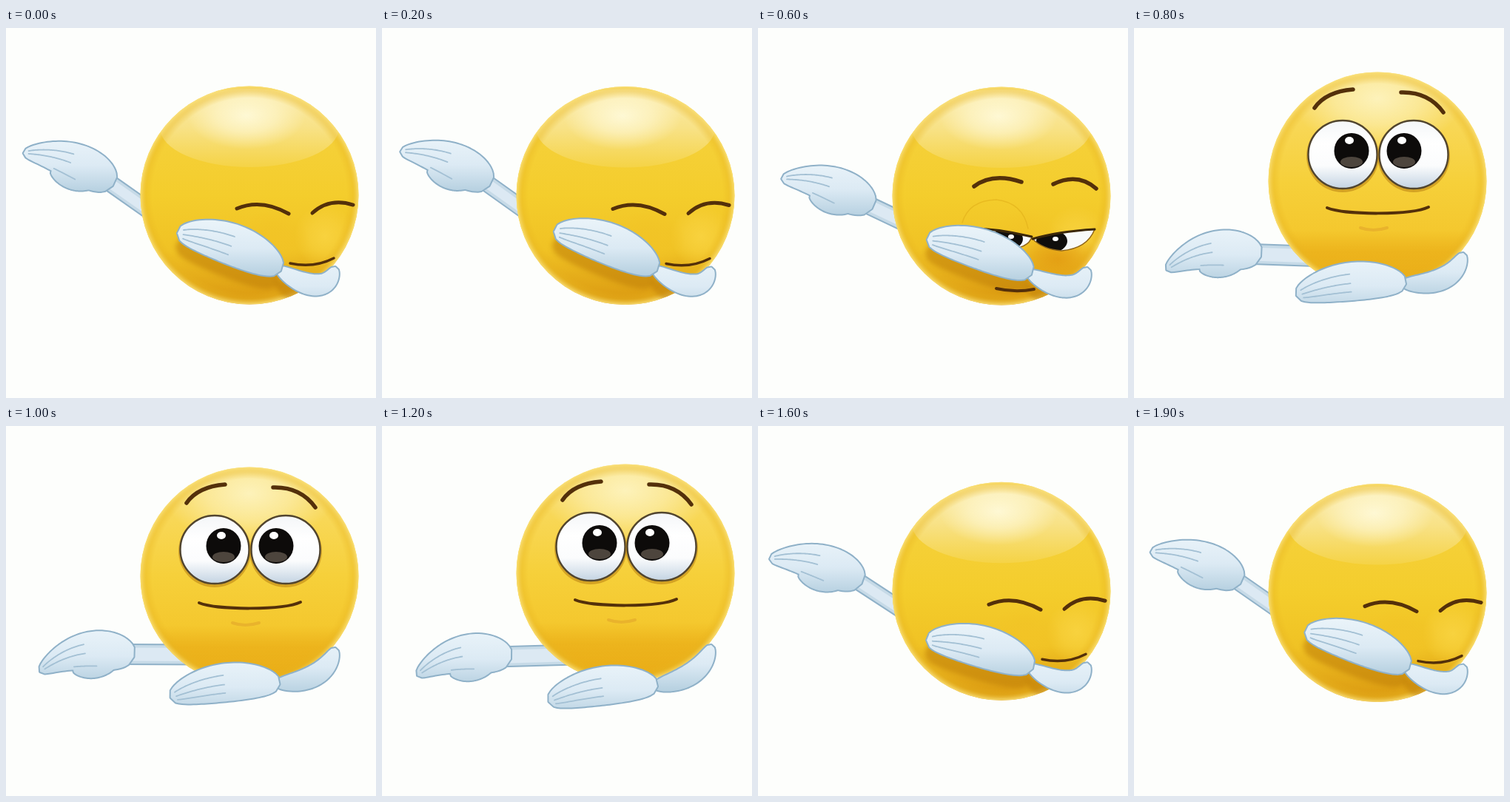
Write an HTML page with a canvas that moves like this. It is 500x500 px and loops after 2 s.

```html
<!DOCTYPE html>
<html lang="en">
<head>
<meta charset="utf-8">
<title>Dabbing smiley</title>
<style>
html, body { margin: 0; width: 100%; height: 100%; overflow: hidden; background: #fdfefc; }
canvas { display: block; width: 100vw; height: 100vh; }
</style>
</head>
<body>
<canvas id="stage" width="500" height="500"></canvas>
<script>
const ctx = document.getElementById('stage').getContext('2d');
const BROWN = '#54300a', SKIN_EDGE = '#8fb1c8';
const HEAD_X = 329, R = 147.5;

const mix = (a, b, t) => a + (b - a) * t;
const clamp = v => Math.max(0, Math.min(1, v));

// rest: 0 is the dab, 1 the arms lowered. drift: slow sway while a pose is held.
function poseAt(step) {
  const rest = clamp(Math.min((step - 5) / 3, (15 - step) / 2));
  const sinceDab = step < 15 ? step + 4 : step - 16;
  const drift = mix(1.5 * Math.exp(-sinceDab / 3) - 0.4, (step - 8) / 4, rest);
  const headY = mix(226, 207, rest ** 3) - mix(2.5, 8, rest) * drift;
  const turn = rest ** 2, sway = mix(4.5, 2, rest) * drift, sink = 6 * rest * drift;
  const face = rest < 0.2 ? shutFace : rest < 0.6 ? slyFace : openFace;
  return {
    face, headY, rest,
    left: makeHand({
      x: mix(144, 171, rest) + mix(-4, 3, rest) * drift, y: mix(213, 309, rest) + sink,
      angle: mix(20, -8, turn) - sway, length: 128, bend: mix(0.19, 0.27, turn),
      width: 34, taper: 0.55, thumb: true
    }),
    right: makeHand({
      x: mix(371, 367, rest) + 5 * rest * drift, y: mix(328, 346, rest) + sink,
      angle: mix(20, -6, turn) - sway, length: 148, bend: 0.15,
      width: mix(29, 27, rest), taper: 0.12
    })
  };
}

// Quadratic curve; at(t, off) gives a point pushed sideways by off.
function curve([x0, y0], [cx, cy], [x1, y1]) {
  return (t, off = 0) => {
    const dx = mix(cx - x0, x1 - cx, t), dy = mix(cy - y0, y1 - cy, t);
    const len = Math.hypot(dx, dy);
    return [
      mix(mix(x0, cx, t), mix(cx, x1, t), t) + off * dy / len,
      mix(mix(y0, cy, t), mix(cy, y1, t), t) - off * dx / len
    ];
  };
}

function trace(at, half, from, to, path = new Path2D()) {
  for (let i = 0; i <= 40; i++) {
    const t = mix(from, to, i / 40);
    path.lineTo(...at(t, half(t)));
  }
  return path;
}

const profile = (width, taper) => t =>
  width * Math.max(0, Math.sin(Math.PI * t)) ** 0.4 * (1 - taper * t);

// Limb with rounded ends around a curve.
function tube(at, half) {
  const path = trace(at, half, 0, 1);
  trace(at, t => -half(t), 1, 0, path);
  path.closePath();
  return path;
}

function makeHand({ x, y, angle, length, bend, width, taper, thumb }) {
  const a = angle * Math.PI / 180, cos = Math.cos(a), sin = Math.sin(a);
  const reach = (along, up) => [x + length * (up * sin - along * cos), y - length * (along * sin + up * cos)];
  const at = curve([x, y], reach(0.5, bend), reach(1, 0));
  const half = profile(width, taper);
  const shapes = [tube(at, half)];
  const lines = [-0.4, 0.1, 0.55].map(k => trace(at, t => k * half(t), 0.5, 0.95));
  if (thumb) {
    shapes.push(tube(curve(at(0.15, 12), at(0.4, 34), at(0.68, 20)), profile(10, 0.2)));
    lines[2] = trace(at, t => 0.8 * half(t), 0.38, 0.66);
  }
  return { at, shapes, lines, y: at(0.5)[1] };
}

function gradient(y0, y1, ...colors) {
  const g = ctx.createLinearGradient(0, y0, 0, y1);
  colors.forEach((c, i) => g.addColorStop(i / (colors.length - 1), c));
  return g;
}

function glow(x, y, rx, ry, rgb) {
  ctx.save();
  ctx.translate(x, y);
  ctx.scale(rx, ry);
  const g = ctx.createRadialGradient(0, 0, 0, 0, 0, 1);
  [1, 0.6, 0].forEach((alpha, i) => g.addColorStop(i / 2, `rgba(${rgb},${alpha})`));
  ctx.fillStyle = g;
  ctx.fillRect(-1, -1, 2, 2);
  ctx.restore();
}

function oval(x, y, rx, ry, fill) {
  ctx.beginPath();
  ctx.ellipse(x, y, rx, ry, 0, 0, 7);
  ctx.fillStyle = fill;
  ctx.fill();
}

function line(path, width, color = BROWN) {
  ctx.strokeStyle = color;
  ctx.lineWidth = width;
  ctx.stroke(typeof path === 'string' ? new Path2D(path) : path);
}

function shutFace() {
  line('M312 244Q345 230 382 251', 5);
  line('M414 250Q437 229 469 239', 5);
  line('M384 318Q416 325 443 311', 3.5);
}

function slyEye(lid, bottom, pupilX, pupilY) {
  const white = new Path2D(lid + bottom);
  ctx.save();
  ctx.fillStyle = '#f8fafb';
  ctx.fill(white);
  ctx.clip(white);
  oval(pupilX, pupilY, 21, 15, '#100e0c');
  oval(pupilX + 5, pupilY - 3, 4, 3, '#fff');
  ctx.restore();
  line(white, 1.5, '#8f6518');
  line(lid, 3, '#3b2709');
}

function slyFace() {
  glow(405, 312, 60, 36, '228,160,20');
  line('M276 262Q285 232 322 231Q358 235 365 270', 1.5, 'rgba(225,175,25,.6)');
  line('M292 213Q317 194 356 207', 5.5);
  line('M399 210Q432 194 457 216', 5.5);
  slyEye('M273 269Q320 269 370 281', 'Q366 297 335 298Q300 297 273 269Z', 337, 284);
  slyEye('M371 284Q405 274 455 271', 'Q445 297 410 300Q385 298 371 284Z', 397, 287);
  line('M322 351Q348 357 373 352', 4);
}

function openEye(x, pupilX) {
  oval(x, 165, 49, 49, 'rgba(180,120,15,.5)');
  oval(x, 163, 46.5, 46, gradient(117, 209, '#f4f6f8', '#ffffff', '#fbfcfd', '#c3d3e2'));
  ctx.strokeStyle = '#51452f';
  ctx.lineWidth = 2.4;
  ctx.stroke();
  oval(pupilX, 158, 23.5, 24, '#0d0b0a');
  oval(pupilX, 173, 15, 7, '#4d453d');
  oval(pupilX - 3, 144, 6, 5, '#fff');
}

function openFace() {
  line('M244 100Q259 78 296 75', 5.5);
  line('M361 79Q398 78 418 106', 5.5);
  openEye(282, 294);
  openEye(378, 365);
  line('M261 235C285 245 375 245 398 234', 4);
  line('M306 262Q323 268 342 262', 4, '#e9b32c');
}

function drawHead({ face, headY, right }, forearm) {
  const open = face === openFace;
  ctx.save();
  ctx.translate(HEAD_X, headY);
  oval(0, 0, R, R, open
    ? gradient(-R, R, '#f8dc70', '#f8d755', '#f6d03a', '#f4c72d', '#eaae19')
    : gradient(-R, R, '#f6d24d', '#f5d038', '#f4cd2c', '#f0c224', '#d9960f'));
  ctx.clip();
  if (open) {
    glow(0, -112, 115, 70, '253,242,186');
    ctx.fillStyle = gradient(66, 96, 'rgba(232,168,18,0)', 'rgba(232,168,18,.5)');
    ctx.fillRect(-R, 66, 2 * R, R);
  } else {
    oval(0, -91, 121, 53, gradient(-146, -38, '#fbecae', '#f8e287', '#f5d346'));
    glow(-4, -108, 80, 46, '254,248,212');
    glow(102, 55, 42, 42, '248,210,62');
    glow(32, 60, 48, 40, '242,196,38');
  }
  const rim = ctx.createRadialGradient(0, 0, R - 16, 0, 0, R);
  ['rgba(232,180,30,0)', 'rgba(232,182,34,.35)', 'rgba(250,224,120,.9)']
    .forEach((c, i) => rim.addColorStop(i / 2, c));
  ctx.fillStyle = rim;
  ctx.fillRect(-R, -R, 2 * R, 2 * R);
  ctx.translate(-HEAD_X, -headY);
  if (!open) {
    ctx.save();
    ctx.translate(-3, 18);
    ctx.fillStyle = 'rgba(190,125,8,.55)';
    ctx.filter = 'blur(3px)';
    [forearm, ...right.shapes].forEach(shape => ctx.fill(shape));
    ctx.restore();
  }
  ctx.translate(0, headY - (open ? 199 : 226));
  face();
  ctx.restore();
}

// Outlines first, then fills, so overlapping shapes merge.
function drawSkin(shapes, y) {
  shapes.forEach(shape => line(shape, 4, SKIN_EDGE));
  ctx.fillStyle = gradient(y - 30, y + 42, '#e9f3f9', '#dceaf4', '#b6d0e0');
  shapes.forEach(shape => ctx.fill(shape));
}

function drawHand(hand) {
  drawSkin(hand.shapes, hand.y);
  hand.lines.forEach(path => line(path, 1.8, '#a3c0d4'));
}

function drawLeftArm({ left, rest }) {
  const arm = new Path2D();
  arm.moveTo(...left.at(0.08));
  arm.lineTo(mix(215, 260, rest), mix(262, 309, rest));
  const width = mix(22, 27, rest);
  line(arm, width + 2, SKIN_EDGE);
  line(arm, width - 2, '#c6dae7');
  line(arm, width - 9, '#dce9f3');
}

function draw(now) {
  const pose = poseAt(Math.floor(now % 2000 / 100));
  const elbowY = pose.headY + 97;
  const forearm = tube(curve(pose.right.at(0.04), [433, elbowY + 48], [445, elbowY]), profile(15, 0.12));

  ctx.fillStyle = '#fdfefc';
  ctx.fillRect(0, 0, 500, 500);
  ctx.lineJoin = ctx.lineCap = 'round';
  drawLeftArm(pose);
  drawHead(pose, forearm);
  drawHand(pose.left);
  drawSkin([forearm], elbowY + 20);
  drawHand(pose.right);
  requestAnimationFrame(draw);
}
requestAnimationFrame(draw);
</script>
</body>
</html>
```
